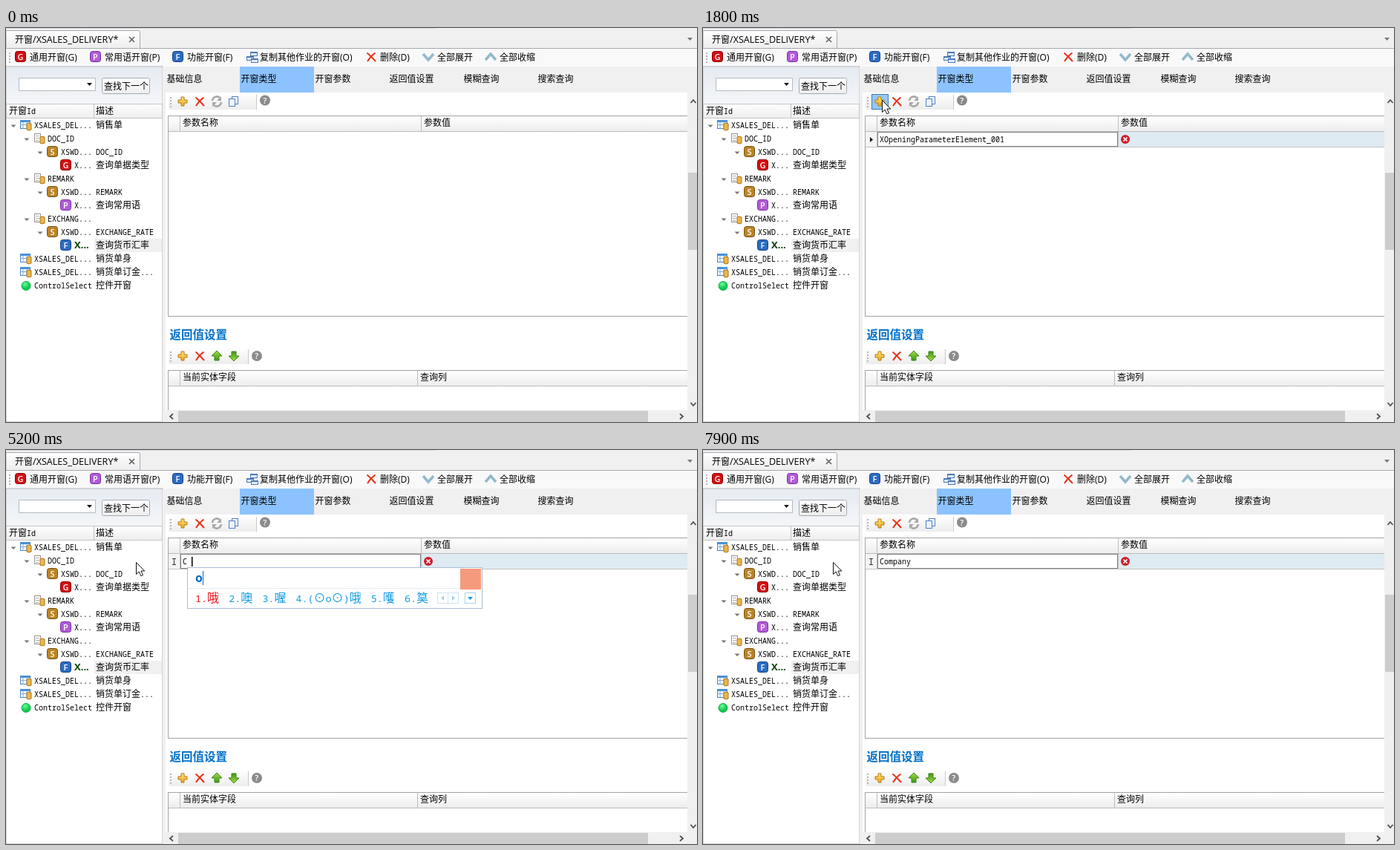
An HTML page that plays this animation: 931 px wide and 531 px high, repeating every 8000 ms.

```html
<!DOCTYPE html>
<html lang="zh-CN">
<head>
<meta charset="utf-8">
<title>开窗</title>
<style>
html, body { margin: 0; width: 100%; height: 100%; overflow: hidden; background: #fff; }
svg { display: block; width: 100%; height: 100%; }
text { font: 12px "Open Sans", "Noto Sans CJK SC", "Noto Sans CJK", sans-serif; fill: #000; white-space: pre; }
.song { font-family: "Noto Sans CJK SC", "Noto Sans CJK", sans-serif; }
.mono { font-family: "Noto Sans Mono", "Liberation Mono", monospace; font-size: 10px; }
.ime { font-size: 16px; fill: #129be6; }
.ime .mono { font-size: 13.33px; }
.first { fill: #e5141c; }
.typed { font-size: 16px; font-weight: bold; fill: #0b6bc9; }
.heading { font-size: 15.5px; font-weight: bold; fill: #0070c8; }
.badge { font-size: 11px; font-weight: 600; fill: #fff; text-anchor: middle; }
.current { font-size: 13px; font-weight: bold; fill: #064006; }
.white { fill: #fff; }
</style>
</head>
<body>
<svg id="stage" viewBox="0 0 931 531">
<defs>
  <linearGradient id="pale" x2="0" y2="1"><stop stop-color="#fff"/><stop offset="1" stop-color="#ededee"/></linearGradient>
  <linearGradient id="panel" x2="0" y2="1"><stop stop-color="#e6ebf2"/><stop offset="1" stop-color="#f4f6f8"/></linearGradient>
  <linearGradient id="gold" x2="0" y2="1"><stop stop-color="#ffe680"/><stop offset="1" stop-color="#f0a818"/></linearGradient>
  <linearGradient id="leaf" x2="0" y2="1"><stop stop-color="#a5dd45"/><stop offset="1" stop-color="#3c9a12"/></linearGradient>
  <radialGradient id="lamp" cx=".4" cy=".3"><stop stop-color="#6cff9a"/><stop offset="1" stop-color="#0cc84c"/></radialGradient>
  <clipPath id="selClip"><rect id="selArea" y="144" height="13"/></clipPath>
</defs>
</svg>
<script>
const stage = document.getElementById('stage');
const $ = id => document.getElementById(id);

const rect = (x, y, w, h, fill, stroke = 'none', more = '') =>
  `<rect x="${x}" y="${y}" width="${w}" height="${h}" fill="${fill}" stroke="${stroke}" ${more}/>`;
const box = (x, y, w, h, fill, stroke, more) => rect(x + .5, y + .5, w - 1, h - 1, fill, stroke, more);
const path = (d, fill, stroke = 'none', width = 1) =>
  `<path d="${d}" fill="${fill}" stroke="${stroke}" stroke-width="${width}"/>`;
const at = (x, y, body) => `<g transform="translate(${x} ${y})">${body}</g>`;
const flip = body => `<g transform="scale(1 -1)">${body}</g>`;
const text = (x, y, s, cls = '') => `<text x="${x}" y="${y}" class="${cls}">${s}</text>`;
const song = (x, y, s, cls = '') =>
  text(x, y, s.replace(/[\x20-\x7e]+/g, m => `<tspan class="mono">${m}</tspan>`), 'song ' + cls);
const group = (id, body) => `<g id="${id}">${body}</g>`;

// Icons are centred on 0,0
const badge = (letter, fill, edge) => box(-8, -8, 15, 15, fill, edge, 'rx="3"') + text(-.5, 3.5, letter, 'badge');
const badges = {
  G: badge('G', '#d40d12', '#8d0000'), P: badge('P', '#b35bd8', '#74309b'),
  F: badge('F', '#2b6cc4', '#173f7c'), S: badge('S', '#bd8524', '#72501a')
};
const cross = path('M-5.5-5.5Q0-1 6 6M5.5-5.5Q-1-1-5 6', 'none', '#e8331d', 2);
const plus = path('M-2-6h4v4h4v4h-4v4h-4v-4h-4v-4h4z', 'url(#gold)', '#b87810');
const help = '<circle r="7" fill="#8b8b8b"/>' + text(-.2, 4, '?', 'badge');
const upArrow = path('M0-7L7 0H3V6H-3V0H-7Z', 'url(#leaf)', '#3d851a');
const refresh = path('M-6-1A6 6 0 0 1 4-5M6 1A6 6 0 0 1-4 5', 'none', '#a8a8a8', 2.6) +
  path('M6-7V-1H0ZM-6 7V1H0Z', '#a8a8a8');
const copy = box(-3, -7, 9, 11, '#fff', '#4d7fc6') + box(-7, -4, 9, 11, '#eef5ff', '#4d7fc6');
const windows = [[-2, -7], [-7, -1], [-1, 2]].map(([x, y]) =>
  box(x, y, 10, 6, '#e3eefb', '#4c79b6') + rect(x, y, 10, 2, '#4c79b6')).join('');
const can = path('M1-2Q4-4 7-2V6Q4 8 1 6Z', '#edb64a', '#a9741a');
const table = box(-8, -7, 14, 12, '#fff', '#4682c0') + rect(-8, -7, 14, 3, '#4a91d8') +
  path('M-4-4V5M1-4V5M-8-.5H6', 'none', '#7babd8') + can;
const sheet = box(-7, -7, 9, 12, '#fff', '#98908a') + path('M-5-3.5h5M-5-.5h5M-5 2.5h4', 'none', '#aaa') + can;
const lamp = '<circle cy=".5" r="6" fill="url(#lamp)" stroke="#13b34a"/>';
const chevron = path('M-7-4L0 4L7-4', 'none', '#93b9cb', 3.5);
const twig = path('M-3.5-1.5h7L0 2z', '#777');
const grip = (x, y) => [0, 4, 8, 12].map(d => rect(x, y + d, 2, 2, '#b5b5b5')).join('');

function frameParts() {
  const tools = [
    [20, badges.G, 32, '通用开窗(G)'], [121, badges.P, 133, '常用语开窗(P)'], [232, badges.F, 244, '功能开窗(F)'],
    [331, windows, 342, '复制其他作业的开窗(O)'], [492, cross, 504, '删除(D)'],
    [569, chevron, 581, '全部展开'], [653, flip(chevron), 665, '全部收缩']
  ];
  const tabs = ['基础信息', '开窗类型', '开窗参数', '返回值设置', '模糊查询', '搜索查询'];
  return rect(0, 0, 931, 27, '#f0f0f1') + rect(0, 0, 578, 1, '#d5d8dc') +
    path('M0 27V3.5H178.5Q180.5 3.5 180.5 6V27', 'url(#pale)', '#a5a9ae') +
    `<text x="12" y="20">开窗<tspan font-size="12.6">/XSALES_DELIVERY*</tspan></text>` +
    path('M166 12l7 7M173 12l-7 7', 'none', '#666', 1.7) + path('M918 13h7l-3.5 4z', '#777') +
    rect(0, 27, 931, 1, '#a5a9ae') + rect(0, 28, 931, 24, '#f9f9fa') + grip(4, 33) +
    tools.map(([x, icon, tx, s]) => at(x, 39, icon) + text(tx, 44, s)).join('') +
    rect(215, 52, 716, 35, '#f0f0f0') + rect(315, 52, 100, 35, '#8cc2ff') +
    tabs.map((s, i) => text(216.5 + 100 * i, 73, s)).join('');
}

function treeParts() {
  // depth, icon, name, description, expanded
  const rows = [
    [0, table, 'XSALES_DEL...', '销售单', true],
    [1, sheet, 'DOC_ID', '', true],
    [2, badges.S, 'XSWD...', 'DOC_ID', true],
    [3, badges.G, 'X...', '查询单据类型'],
    [1, sheet, 'REMARK', '', true],
    [2, badges.S, 'XSWD...', 'REMARK', true],
    [3, badges.P, 'X...', '查询常用语'],
    [1, sheet, 'EXCHANG...', '', true],
    [2, badges.S, 'XSWD...', 'EXCHANGE_RATE', true],
    [3, badges.F, 'X...', '查询货币汇率'],
    [0, table, 'XSALES_DEL...', '销货单身'],
    [0, table, 'XSALES_DEL...', '销货单订金...'],
    [0, lamp, 'ControlSelect', '控件开窗']
  ];
  const currentRow = 9;
  return rect(0, 52, 211, 479, '#fff', '#a9adb3') + rect(1, 53, 209, 49, 'url(#panel)') +
    box(17, 67, 104, 18, '#fff', '#b5bac1') + path('M109 74h7l-3.5 4z', '#111') +
    box(129, 67, 65, 22, 'url(#pale)', '#a6abb2', 'rx="2"') + text(132, 82.5, '查找下一个') +
    box(0, 102, 211, 20, 'url(#pale)', '#c3c6ca') + rect(118, 102, 1, 20, '#bfc2c6') +
    song(4, 116, '开窗Id') + song(121, 116, '描述') + rect(119, 284, 91, 18, '#f0f0f1') +
    rows.map(([depth, icon, name, note, open], i) => {
      const x = 18 * depth, y = 131 + 18 * i;
      const label = i === currentRow ? text : song;
      return (open ? at(10 + x, y + 1, twig) : '') + at(27 + x, y, icon) +
        label(38 + x, y + 4, name, i === currentRow ? 'current' : '') + song(121, y + 4, note);
    }).join('') + rect(211, 53, 4, 478, '#f0f0f0');
}

function gridParts() {
  const bar = (y, end) => rect(219, y - 11, end - 219, 22, 'url(#pale)', 'none', 'rx="2"') +
    rect(end - 1, y - 9, 1, 20, '#c8c8c8') + grip(221, y - 6);
  const icons = (y, list) => list.map((icon, i) => at(238 + 23 * i, y, icon)).join('');
  const grid = (y, h, split, a, b) => box(218, y, 702, h, '#fff', '#a3a3a3') +
    rect(219, y + 1, 700, 20, 'url(#pale)') + rect(219, y + 21, 700, 1, '#bcbcbc') +
    [234, split].map(x => rect(x, y + 1, 1, 20, '#bcbcbc')).join('') +
    song(238, y + 14, a) + song(split + 4, y + 14, b);
  const arrow = (x, y, turn) =>
    `<g transform="translate(${x} ${y}) rotate(${turn})">${path('M-3.5 2L0-2L3.5 2', 'none', '#505050', 1.8)}</g>`;
  return bar(99, 338) + group('hover', box(227, 89, 23, 21, '#98c6f5', '#3f79ba')) +
    icons(99, [plus, cross, refresh, copy]) + at(349, 97.5, help) +
    grid(118, 271, 559, '参数名称', '参数值') +
    text(220.5, 418.5, '返回值设置', 'heading') +
    bar(442, 327) + icons(442, [plus, cross, upArrow, flip(upArrow)]) + at(338, 442, help) +
    grid(461, 70, 554, '当前实体字段', '查询列') +
    rect(918, 87, 13, 444, '#f0f0f0') + rect(919, 195, 12, 104, '#cdcdcd') +
    arrow(926, 99, 0) + arrow(926, 507, 180) +
    rect(215, 515, 716, 16, '#f0f0f0') + rect(232, 516, 633, 15, '#cdcdcd') +
    arrow(223, 523.5, -90) + arrow(910, 523.5, 90);
}

function rowParts() {
  return group('row', rect(219, 140, 15, 20, '#f4f4f4') + rect(234, 140, 1, 21, '#bcbcbc') +
    rect(560, 140, 358, 20, '#deebf2') + rect(219, 160, 699, 1, '#c4c4c4') + rect(559, 140, 1, 20, '#c4c4c4') +
    box(235, 140, 324, 20, '#fff', '#000', 'stroke-dasharray="1 1"') +
    '<circle cx="569" cy="150" r="6" fill="#cf1f2b"/>' + path('M566.5 147.5l5 5M571.5 147.5l-5 5', 'none', '#fff', 1.7) +
    group('focusMark', path('M225 147v7l4-3.5z', '#111')) +
    group('pencilMark', path('M224 156l.5-4 3.5-6 2 1-3.5 6.5zM224.5 152l2 1.5', '#fff', '#222')) +
    group('editMark', path('M224 146.5h5M226.5 146.5v8M224 154.5h5', 'none', '#333')) +
    '<text id="cell" x="238" y="154" class="mono"></text>' +
    `<g id="selection" clip-path="url(#selClip)">${rect(237, 144, 170, 13, '#0078d7')}
      ${text(238, 154, 'XOpeningParameterElement_001', 'mono white')}</g>` +
    rect(0, 144, 1.5, 13, '#000', 'none', 'id="caret"'));
}

function popup(id, right, typed, caretX, words, more) {
  let x = 255;
  const items = words.map((word, i) => {
    const s = `${i + 1}.${word}`;
    const item = song(x, 205, s, i ? 'ime' : 'ime first');
    for (const c of s) x += /[\x20-\x7e]/.test(c) ? 8 : 16;
    x += 13.2;
    return item;
  }).join('');
  const page = right - 61;
  return group(id, box(244, 158, right - 244, 56, '#fff', '#a9bed6') + rect(245, 186, right - 246, 1, '#e3ebf3') +
    text(255, 178, typed, 'typed') + rect(caretX, 163, 1, 19, '#0b6bc9') + items +
    box(page, 192, 15, 15, '#fff', '#cfe3f5') + box(page + 14, 192, 15, 15, '#fff', '#cfe3f5') +
    box(right - 24, 192, 15, 15, '#fff', '#a8d4f4') +
    path(`M${page + 9} 196v7l-4-3.5z`, '#a9cfea') + path(`M${page + 20} 196v7l4-3.5z`, more ? '#129be6' : '#a9cfea') +
    path(`M${right - 20} 198h7l-3.5 4z`, '#129be6') + rect(right - 30, 160, 28, 28, '#f69a7d'));
}

stage.insertAdjacentHTML('beforeend', rect(0, 0, 931, 531, '#fff') + frameParts() + treeParts() + gridParts() + rowParts() +
  popup('imeShort', 642, 'o', 265, ['哦', '噢', '喔', '(⊙o⊙)哦', '嚄', '筽']) +
  popup('imeLong', 849, "o'm", 283, ['欧美', '偶们', '欧盟', '欧码', 'Ω', '欧姆', '哦么', '欧曼', '欧明'], true) +
  group('pointer', path('M.5.5V16.5L4.2 13 6.8 18.8 9.5 17.6 7 12H11.8Z', '#fff', '#111')) +
  group('beam', path('M-3-8.5h6M0-8.5v17M-3 8.5h6', 'none', '#111')));

// time, x, y of the mouse
const route = [
  [200, 833, 136], [700, 340, 61], [900, 251, 90], [1000, 262, 108], [1200, 241, 97], [1900, 241, 97],
  [2400, 418, 144], [2600, 446, 155], [2800, 448, 149], [3100, 173, 149], [3200, 173, 149],
  [3400, 174, 150], [3600, 174, 150], [3800, 175, 151], [8000, 175, 151]
];
const typing = [[0, ''], [1600, 'XOpeningParameterElement_001'], [4300, 'C'], [6000, 'Com'], [6500, 'Comp'],
  [6700, 'Compa'], [7000, 'Compan'], [7400, 'Company']];

function mouseAt(t) {
  const i = Math.max(1, route.findIndex(p => p[0] >= t));
  const [t0, x0, y0] = route[i - 1], [t1, x1, y1] = route[i];
  const k = Math.max(0, (t - t0) / (t1 - t0));
  return [Math.round(x0 + (x1 - x0) * k), Math.round(y0 + (y1 - y0) * k)];
}

function draw(now) {
  const t = Math.floor(now % 8000 / 100) * 100;
  const during = (a, b) => t >= a && t < b;
  const show = (id, on) => $(id).setAttribute('visibility', on ? 'inherit' : 'hidden');
  const [x, y] = mouseAt(t);
  const word = typing.findLast(step => step[0] <= t)[1];
  const dragging = during(2800, 3300);

  for (const id of ['pointer', 'beam']) $(id).setAttribute('transform', `translate(${x} ${y})`);
  show('pointer', t >= 200 && !dragging && !during(4300, 4700) && !during(6500, 7800));
  show('beam', dragging);
  show('hover', during(1100, 2000));
  $('hover').firstChild.setAttribute('fill', during(1500, 1700) ? '#78afe8' : '#98c6f5');

  show('row', t >= 1600);
  const mark = (id, a, b) => show(id, during(a, b));
  mark('focusMark', 1600, 2700);
  mark('pencilMark', 2700, 4300);
  mark('editMark', 4300, 8000);
  $('cell').textContent = word;

  const from = Math.min(407, Math.max(237, x));
  $('selArea').setAttribute('x', from);
  $('selArea').setAttribute('width', 407 - from);
  show('selection', during(2900, 4300));

  $('caret').setAttribute('x', during(4800, 6000) ? 250 : 238 + 6 * word.length);
  show('caret', during(4300, 7900));
  show('imeShort', during(4800, 5300));
  show('imeLong', during(5300, 6000));
}

// "inherit" would reveal marks of a hidden row only if the row is shown
const start = performance.now();
function tick() {
  draw(performance.now() - start);
  requestAnimationFrame(tick);
}
tick();
</script>
</body>
</html>
```
